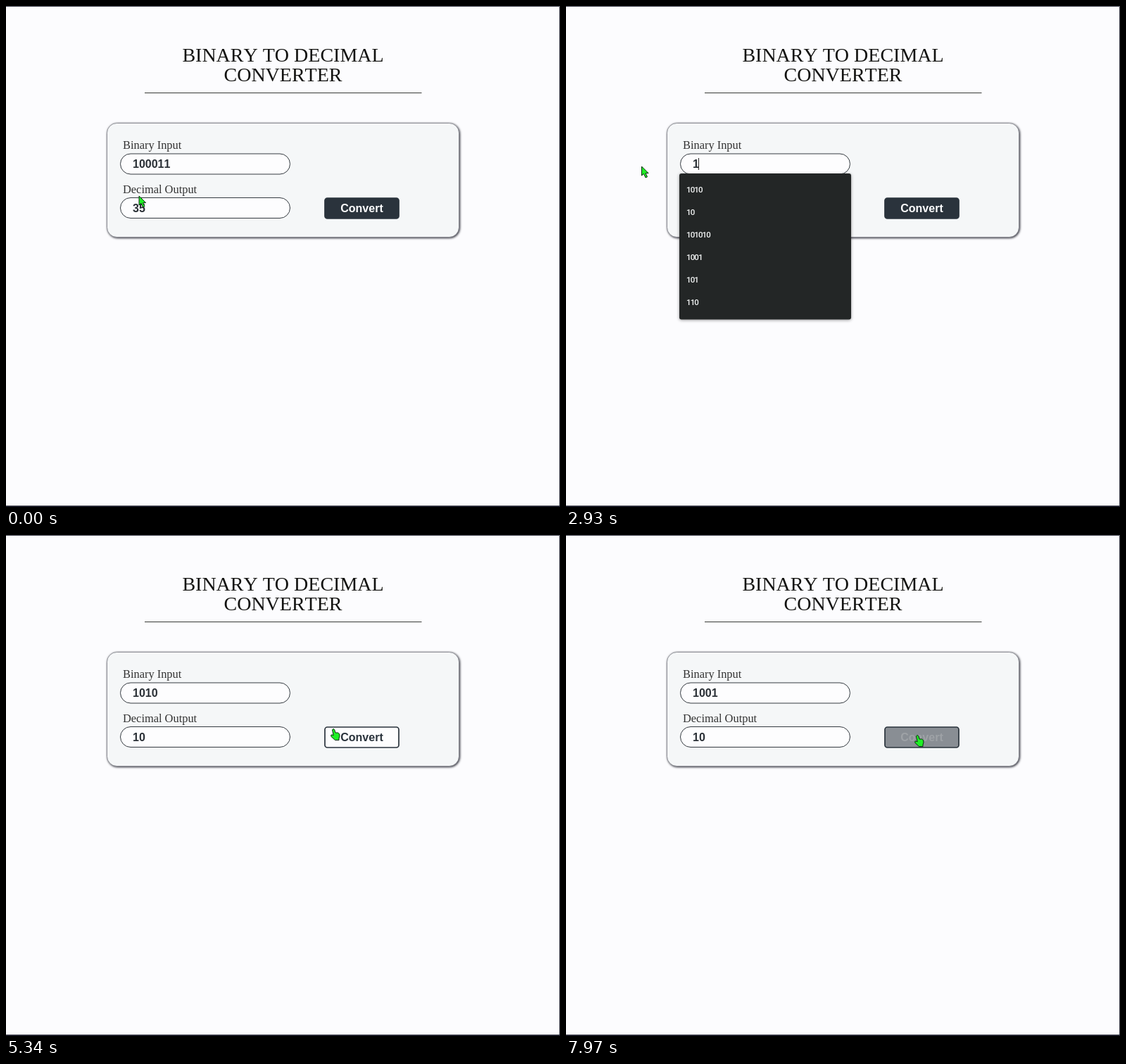
An HTML page that plays this animation: 787x712 px, repeating every 8 s.

```html
<!DOCTYPE html>
<html lang="en">
<head>
<meta charset="utf-8">
<title>Binary to decimal converter</title>
<style>
  html, body { margin: 0; width: 100%; height: 100%; overflow: hidden; background: #fcfcfe; }
  svg { display: block; font-kerning: none; }
  .serif { font-family: "Liberation Serif", serif; fill: #222; }
  .title { font-size: 28px; text-anchor: middle; fill: #121210; }
  .label { font-size: 16.4px; fill: #333; }
  .bold { font: bold 16px "Liberation Sans", sans-serif; font-kerning: none; fill: #2a3036; }
  .field { fill: #fdfdfe; stroke: #343a40; }
  .card { fill: #f5f7f8; stroke: #80828a; stroke-width: .8;
    filter: drop-shadow(1px 1px 1.5px #33343f) drop-shadow(0 0 1px #5553); }
  .menu { fill: #232626; filter: drop-shadow(0 1px 2px #0006); }
  .option { font: 500 11.5px Roboto, sans-serif; letter-spacing: -.9px; fill: #f4f6f6; }
  .cursor { fill: #1fef25; stroke: #0c2a10; stroke-linejoin: round; }
</style>
</head>
<body>
<svg width="787" height="712" viewBox="0 0 787 712">
  <path d="M0 .5H786.5V712" fill="none" stroke="#3a3b48"/>
  <path d="M0 711H787" stroke="#262733" stroke-width="2"/>
  <g class="serif">
    <text class="title" x="393.5" y="79">BINARY TO DECIMAL</text>
    <text class="title" x="393.5" y="107">CONVERTER</text>
  </g>
  <path d="M197 123.5H590.5" stroke="#383a36"/>
  <rect class="card" x="143.5" y="166.5" width="500" height="162" rx="14"/>
  <text class="serif label" x="166" y="203">Binary Input</text>
  <text class="serif label" x="166" y="266">Decimal Output</text>
  <rect class="field" x="162.5" y="210" width="241" height="29" rx="14.5"/>
  <rect class="field" x="162.5" y="272.5" width="241" height="29" rx="14.5"/>
  <rect id="selection" y="215" height="19" fill="#0078d7"/>
  <text class="bold" x="180" y="230"><tspan id="plain"></tspan><tspan id="selected" fill="#fff"></tspan></text>
  <rect id="caret" y="216" width="1" height="17" fill="#222"/>
  <text class="bold" id="output" x="180" y="293"></text>
  <rect id="button" x="453" y="273" width="105" height="29" rx="3.5" stroke="#2a333c" stroke-width="1.7"/>
  <text class="bold" id="buttonText" x="505.5" y="293" text-anchor="middle">Convert</text>
  <g id="menu">
    <rect class="menu" id="menuBox" x="161" y="238" width="244" rx="3"/>
    <g id="options"></g>
  </g>
  <g id="cursor" class="cursor">
    <path id="arrow" d="M0 0V13L3 10.4L5.6 16L8 14.8L5.6 9.6H9.6Z"/>
    <g id="beam" fill="none">
      <path d="M-4 -6H4M0 -6V6M-4 6H4" stroke="#0c2a12" stroke-width="3"/>
      <path d="M-3.5 -6H3.5M0 -6V6M-3.5 6H3.5" stroke="#2f8a3c"/>
    </g>
    <path id="hand" d="M2.5 1.8Q4 -.7 5.6 1.5L7 6L10.5 6Q13.5 7 13 11L12 14V16.6H6.5L1 11.5Q-.2 9 2 8.8L4.2 9.8Z"/>
  </g>
</svg>
<script>
const LOOP = 8000, TEXT_X = 180, DIGIT = 8.9;
const el = id => document.getElementById(id);
const show = (id, on) => el(id).setAttribute('visibility', on ? 'inherit' : 'hidden');
const set = (id, attrs) => Object.entries(attrs).forEach(([k, v]) => el(id).setAttribute(k, v));
const clamp = (v, lo, hi) => Math.min(hi, Math.max(lo, v));
const mix = (a, b, p) => a + (b - a) * p;

const HISTORY = ['1010', '10', '101010', '1001', '101', '110'];
// time, field value, text the menu matches (null: menu closed)
const INPUT = [
  [0, '100011', null], [2930, '1', '1'], [3090, '10', '10'], [3250, '101', '101'],
  [3400, '1010', '1010'], [4900, '1010', null], [5700, '1010', '1010'], [6230, '101', '101'],
  [6420, '10', '10'], [6950, '100', '10'], [7000, '100', '100'], [7120, '1001', null]
];
// time, x, y
const PATH = [
  [0, 189, 270], [130, 189, 270], [300, 215, 266], [500, 330, 262], [700, 452, 275], [930, 500, 285],
  [980, 500, 285], [1210, 452, 266], [1270, 320, 231.5], [1350, 285, 229], [1740, 107.5, 228],
  [4110, 107.5, 228], [4250, 140, 234], [4700, 452, 273], [4880, 461, 275],
  [5340, 461, 275], [5390, 450, 272], [5680, 263.5, 226],
  [7590, 263.5, 226], [7800, 390, 262], [7890, 452, 279], [7970, 495, 284], [LOOP, 495, 284]
];
const HOVERS = [[700, 1210], [4700, 5390], [7890, LOOP]];
const CARETS = [[2930, 3900], [4400, 4900], [5700, 7290]];
const DRAG = [1350, 2930];
const FADE = 300;

const within = (t, [from, to]) => t >= from && t < to;

// cubic-bezier(.25, .1, .25, 1)
function ease(x) {
  const bezier = (a, b, s) => 3 * a * s * (1 - s) ** 2 + 3 * b * s * s * (1 - s) + s ** 3;
  let lo = 0, hi = 1;
  for (let i = 0; i < 20; i++) {
    const mid = (lo + hi) / 2;
    if (bezier(.25, .25, mid) < x) lo = mid; else hi = mid;
  }
  return bezier(.1, 1, lo);
}

function cursorAt(t) {
  const i = PATH.findIndex(key => key[0] > t);
  const [t0, x0, y0] = PATH[i - 1], [t1, x1, y1] = PATH[i];
  const p = (t - t0) / (t1 - t0);
  return [mix(x0, x1, p), mix(y0, y1, p)];
}

function hoverAt(t) {
  const last = HOVERS.filter(h => h[0] <= t).pop();
  if (!last) return 0;
  const fade = start => ease(clamp((t - start) / FADE, 0, 1));
  return t < last[1] ? fade(last[0]) : 1 - fade(last[1]);
}

const blend = (a, b, p) => `rgb(${a.map((v, i) => Math.round(mix(v, b[i], p)))})`;

function drawInput(t, cursorX) {
  const [, value, query] = INPUT.filter(step => step[0] <= t).pop();
  const start = within(t, DRAG)
    ? clamp(Math.round((cursorX - TEXT_X) / DIGIT), 0, value.length) : value.length;
  el('plain').textContent = value.slice(0, start);
  el('selected').textContent = value.slice(start);
  set('selection', { x: TEXT_X + start * DIGIT, width: (value.length - start) * DIGIT });
  set('caret', { x: Math.floor(TEXT_X + value.length * DIGIT) });
  show('caret', CARETS.some(span => within(t, span)));

  const matches = query ? HISTORY.filter(item => item.startsWith(query)) : [];
  show('menu', matches.length);
  set('menuBox', { height: 16 + 31.9 * matches.length });
  el('options').innerHTML = matches.map((item, i) =>
    `<text class="option" x="171" y="${265 + 31.9 * i}">${item}</text>`).join('');
  return matches.length > 0;
}

function drawCursor(t, x, y, menuOpen) {
  const hovering = HOVERS.some(span => within(t, span));
  const overField = x > 162 && x < 404 &&
    (y > 210 && y < (menuOpen ? 238 : 240) || !menuOpen && y > 272 && y < 302);
  const dragging = t >= DRAG[0] && t < 1740;
  const shape = hovering ? 'hand' : overField || dragging ? 'beam' : 'arrow';
  ['arrow', 'beam', 'hand'].forEach(id => show(id, id === shape));
  set('cursor', { transform: `translate(${Math.round(x * 2) / 2} ${Math.round(y * 2) / 2})` });
}

function draw(t) {
  const [x, y] = cursorAt(t);
  const menuOpen = drawInput(t, x);
  el('output').textContent = t < 5000 ? '35' : '10';
  const dark = [42, 51, 60], light = [253, 253, 254], hover = hoverAt(t);
  set('button', { fill: blend(dark, light, hover) });
  el('buttonText').style.fill = blend(light, dark, hover);
  drawCursor(t, x, y, menuOpen);
}

const began = performance.now();
function tick() {
  draw((performance.now() - began) % LOOP);
  requestAnimationFrame(tick);
}
tick();
</script>
</body>
</html>
```
